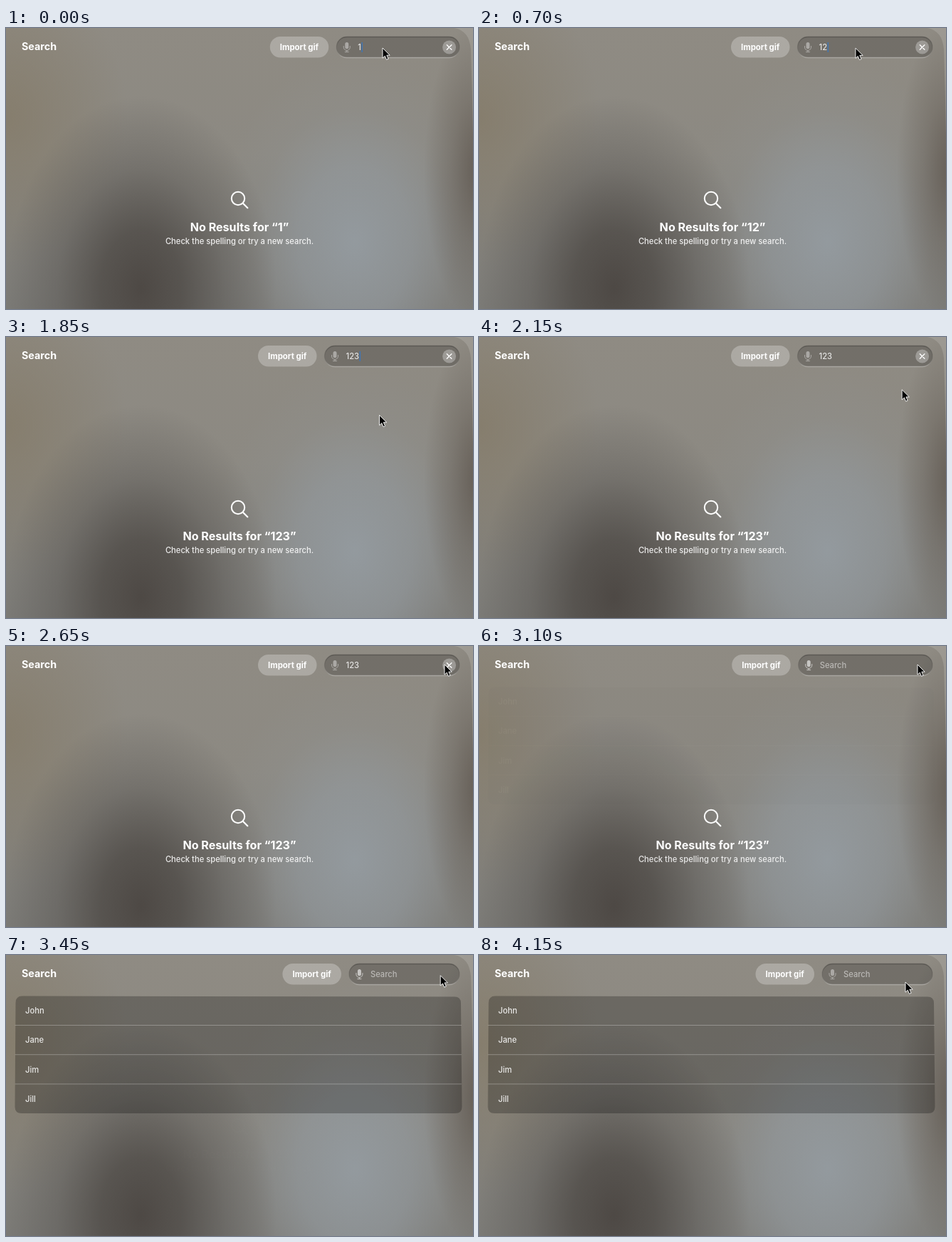
These frames come from a looping animation (656x394 px, 4.2 s). An HTML page:

```html
<!DOCTYPE html>
<html lang="en">
<head>
<meta charset="utf-8">
<title>Search</title>
<style>
html, body { margin: 0; width: 100%; height: 100%; overflow: hidden; }
body {
  background:
    radial-gradient(75px 210px at 662px 200px, rgba(92,84,76,.8), rgba(92,84,76,.35) 50%, transparent),
    radial-gradient(190px 270px at 190px 365px, rgba(76,71,67,.97), rgba(78,74,70,.8) 30%, rgba(84,81,78,.4) 62%, rgba(90,88,85,0)),
    radial-gradient(200px 260px at 490px 300px, rgba(148,155,160,.95), rgba(147,153,157,.7) 40%, rgba(145,148,148,.25) 72%, rgba(145,148,148,0)),
    radial-gradient(170px 210px at 0 125px, rgba(130,119,98,.65), rgba(130,119,98,0)),
    linear-gradient(#8f8b83, #8c8982 45%, #7b7a76);
}
svg { display: block; width: 656px; height: 394px; font: 500 11.2px Inter, "Open Sans", sans-serif; fill: #fff; }
.bold { font-weight: 700; }
.line { fill: none; stroke: #fff; stroke-linecap: round; }
</style>
</head>
<body>
<svg viewBox="0 0 656 394">
  <defs>
    <linearGradient id="rim" x2="0" y2="1">
      <stop stop-color="#000" stop-opacity=".28"/>
      <stop offset=".5" stop-color="#000" stop-opacity=".1"/>
      <stop offset="1" stop-color="#fff" stop-opacity=".3"/>
    </linearGradient>
  </defs>
  <path d="M630 0Q651 4 653 30Q655 90 656 150V0z" fill="#b0ada7" opacity=".45"/>
  <text class="bold" x="22" y="31" font-size="14.3">Search</text>

  <g id="list">
    <path d="M23 57.5L630 58.5Q639 58.5 639 67.5L640.5 213Q640.5 222 631 222H22Q12.5 222 12.5 213L13.5 67Q13.5 57.5 23 57.5z" fill="#000" opacity=".25"/>
  </g>

  <g id="empty">
    <circle class="line" cx="326" cy="239" r="9.2" stroke-width="2"/>
    <path class="line" d="M333 246L339.3 252.3" stroke-width="2.2"/>
    <text id="title" class="bold" x="328" y="285" font-size="16.1" text-anchor="middle"></text>
    <text x="328" y="303" text-anchor="middle" opacity=".88">Check the spelling or try a new search.</text>
  </g>

  <rect id="field" y="12.5" height="29" rx="14.5" fill="#000" fill-opacity=".2" stroke="url(#rim)" stroke-width="1.3"/>
  <g id="bar">
    <rect x="-93.5" y="12" width="82.5" height="29.5" rx="14.75" opacity=".26"/>
    <text class="bold" x="-52.3" y="31" font-size="11.4" text-anchor="middle">Import gif</text>
    <g id="mic">
      <rect x="12" y="20" width="5" height="9.2" rx="2.5"/>
      <path class="line" d="M10 25.5V27A4.5 4.5 0 0 0 19 27V25.5M14.5 31.5V33.6M12 33.6H17"/>
    </g>
    <text id="query" x="30" y="31"></text>
    <rect id="caret" y="20" width="1.5" height="14" fill="#3478c8"/>
  </g>
  <g id="clear">
    <circle cx="622.6" cy="27" r="9.5" opacity=".3"/>
    <path class="line" d="M619.3 23.7l6.6 6.6m0-6.6l-6.6 6.6" stroke-width="1.3"/>
  </g>
  <path id="pointer" d="M0 0V14.2L3.3 11.2L5.5 16.4L8 15.3L5.8 10.2H10.2z" fill="#000" stroke="#fff" stroke-width=".9"/>
</svg>
<script>
const $ = id => document.getElementById(id);
const LOOP = 4200, OPEN = -76, CLOSE = 3088;
const WIDE = 447.5, NARROW = 482;

// pointer stops: time, x, y
const stops = [
  [0, 529, 28], [700, 529, 28], [1150, 508, 118], [1780, 508, 118],
  [2150, 594, 74], [2300, 611, 46], [2480, 616, 26], [3400, 616, 26],
  [3550, 599, 34], [3920, 599, 34], [4150, 599, 38], [LOOP, 599, 38]
];

$('list').innerHTML += ['John', 'Jane', 'Jim', 'Jill'].map((name, i) => {
  const y = 57.3 + i * 41.2;
  const divider = i ? `<path class="line" d="M13 ${y}H639.5" opacity=".28"/>` : '';
  return `${divider}<text x="27" y="${y + 24.8}" opacity=".85">${name}</text>`;
}).join('');

const clamp = v => Math.max(0, Math.min(1, v));
const mix = (a, b, p) => a + (b - a) * p;

// critically damped spring from 0 to 1
function spring(ms) {
  const k = Math.max(0, ms) * .0224;
  return 1 - (1 + k) * Math.exp(-k);
}

function pointerAt(t) {
  const i = stops.findIndex(s => s[0] > t);
  const [t0, x0, y0] = stops[i - 1], [t1, x1, y1] = stops[i];
  const p = (t - t0) / (t1 - t0);
  return [mix(x0, x1, p), mix(y0, y1, p)];
}

function draw(t) {
  const typed = t < 130 ? '1' : t < 1550 ? '12' : '123';
  const closed = t >= CLOSE;
  const p = spring(t - CLOSE);
  const left = closed ? mix(WIDE, NARROW, p) : mix(NARROW, WIDE, spring(t - OPEN));

  $('field').setAttribute('x', left);
  $('field').setAttribute('width', 637 - left);
  $('bar').setAttribute('transform', `translate(${left})`);
  $('pointer').setAttribute('transform', `translate(${pointerAt(t)})`);

  $('query').textContent = closed ? 'Search' : typed;
  $('query').style.opacity = closed ? .5 : .8;
  $('title').textContent = `No Results for “${typed}”`;
  $('list').style.opacity = p;
  $('empty').style.opacity = 1 - p;
  $('clear').style.opacity = closed ? 0 : 1;
  $('mic').style.opacity = closed && t < 3500 ? .6 : .4;

  const fadeAt = t < 1550 ? 700 : 2000;
  $('caret').setAttribute('x', 30.5 + $('query').getComputedTextLength());
  $('caret').style.opacity = closed ? 0 : .8 * clamp(1 - (t - fadeAt) / 130);
}

function tick() {
  draw(performance.now() % LOOP);
  requestAnimationFrame(tick);
}
tick();
</script>
</body>
</html>
```
